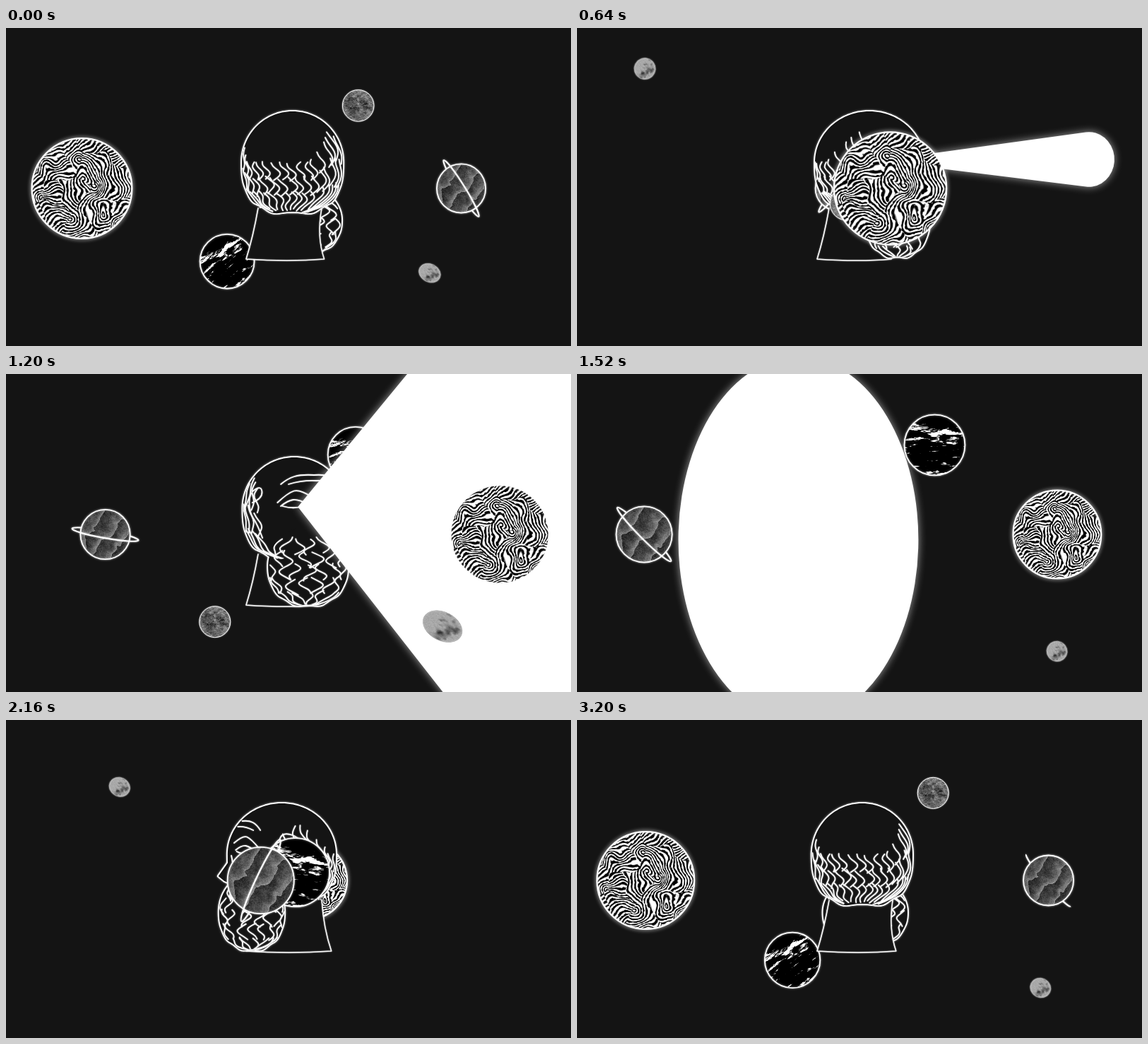
Recreate the animation shown at these times as an HTML page with a canvas. Size 800 by 450 pixels, loop 3280 ms.

```html
<!DOCTYPE html>
<html lang="en">
<head>
<meta charset="utf-8">
<title>Orbiting thoughts</title>
<style>
html, body { margin: 0; width: 100%; height: 100%; overflow: hidden; background: #141414; }
canvas { display: block; width: 800px; height: 450px; }
</style>
</head>
<body>
<canvas id="stage" width="800" height="450"></canvas>
<script>
const LOOP = 3280, STEP = 80, TURN = Math.PI * 2, BG = '#141414';
const ctx = document.getElementById('stage').getContext('2d');
const { sin, cos, acos, atan2, hypot, floor, min, max, abs, exp, sign } = Math;
const clamp = (v, a = 0, b = 1) => min(b, max(a, v));
const mix = (a, b, k) => a + (b - a) * k;
const turn = ms => TURN * ms / LOOP;
const rad = deg => deg * Math.PI / 180;
const bell = (t, peak, width) => exp(-(((t - peak) / width) ** 2));
const list = (n, make) => Array.from({ length: n }, (_, i) => make(i));

// ---------- planet surfaces ----------
const hash = (x, y) => { const s = sin(x * 127.1 + y * 311.7) * 43758.5453; return s - floor(s); };
function noise(x, y) {
  const i = floor(x), j = floor(y), fx = x - i, fy = y - j;
  const u = fx * fx * (3 - 2 * fx), v = fy * fy * (3 - 2 * fy);
  return mix(mix(hash(i, j), hash(i + 1, j), u), mix(hash(i, j + 1), hash(i + 1, j + 1), u), v);
}
const fbm = (x, y) => noise(x, y) * .5 + noise(x * 2.1 + 7, y * 2.1) * .3 + noise(x * 4.3, y * 4.3 + 5) * .2;

function surface(shade) {
  const size = 200, c = document.createElement('canvas');
  c.width = c.height = size;
  const g = c.getContext('2d'), img = g.createImageData(size, size);
  for (let i = 0; i < size * size; i++) {
    const v = 255 * clamp(shade(i % size / size * 2 - 1, floor(i / size) / size * 2 - 1));
    img.data.set([v, v, v, 255], i * 4);
  }
  g.putImageData(img, 0, 0);
  return c;
}

// Each patch of ridges is a set of arcs round a point beside the patch.
const patches = list(14, i => {
  const x = hash(i, 3) * 2.2 - 1.1, y = hash(i, 8) * 2.2 - 1.1, a = hash(i, 5) * TURN, far = .1 + .5 * hash(i, 6);
  return { x, y, ox: x + far * cos(a), oy: y + far * sin(a) };
});
const ridges = surface((x, y) => {
  const wx = x + .2 * noise(x * 4 + 9, y * 4), wy = y + .2 * noise(x * 4, y * 4 + 20);
  const away = p => hypot(wx - p.x, wy - p.y);
  const patch = patches.reduce((a, b) => away(a) < away(b) ? a : b);
  const grain = noise(x * 26 + 40, y * 26) - .5;
  return .5 + 1.1 * sin(hypot(wx - patch.ox, wy - patch.oy) * 100 + grain) + grain * 1.5;
});
const streaks = surface((x, y) => {
  const bend = y + .1 * noise(x * 2 + 5, y * 3);
  const cover = .13 * cos((bend + .35) * 4.5);
  return (fbm(x * 3 + 11, bend * 12 + 3) + .12 * noise(x * 24, y * 24) + cover - .7) * 8
    + .04 + .2 * noise(x * 30, y * 30) * noise(x * 4, y * 4);
});
const dunes = surface((x, y) => {
  const h = y * 1.5 + .6 * x + 1.3 * fbm(x * 1.6 + 3, y * 1.6 + 1), f = h - floor(h);
  return .1 + .34 * f * f + .16 * noise(x * 40, y * 40) + .16 * (fbm(x * 4, y * 4) - .4);
});
const clouds = surface((x, y) => .02 + .7 * fbm(x * 4 + 30, y * 7) + .2 * (noise(x * 30, y * 30) - .5));
const maria = surface((x, y) => .66 - .6 * clamp(fbm(x * 1.6 + 8, y * 1.6 + 4) - .48) * 2 + .08 * (noise(x * 24, y * 24) - .5));

// ---------- orbits: uniform turning seen in perspective ----------
const planets = [
  { skin: ridges, r: 65, cx: 400, cy: 227, dx: 300, dy: 0, near: 578, depth: .185, line: 2.3, glow: 6 },
  { skin: clouds, r: 21.2, cx: 400, cy: 227, dx: -107, dy: 127, near: 560, depth: .1, line: 1, glow: 2 },
  { skin: streaks, r: 41.2, cx: 400, cy: 227, dx: -106, dy: 126, near: 2200, depth: .15, line: 1.8, glow: 3,
    spin: t => rad(-17) + rad(27) * cos(turn(t - 2000)) },
  { skin: dunes, r: 37.7, cx: 400, cy: 227, dx: 299, dy: 0, near: 2215, depth: .2, line: 1.8, glow: 3,
    spin: () => rad(-30), ring: t => turn(t) - rad(121.8) },
  { skin: maria, r: 15, cx: 400, cy: 232, dx: 305, dy: 175, near: 2693, depth: .3, line: .6, glow: 2, laps: 2, smear: .65 }
];

function locate(p, t) {
  const a = turn(t - p.near) * (p.laps || 1), k = 1 / (1 - p.depth * cos(a));
  return {
    p, r: p.r * k, x: p.cx + p.dx * sin(a) * k, y: p.cy + p.dy * sin(a) * k,
    facing: cos(a), z: cos(a) * hypot(p.dx, p.dy)
  };
}

function glow(blur) {
  ctx.shadowColor = blur ? 'rgba(255,255,255,.6)' : 'transparent';
  ctx.shadowBlur = blur;
}

function drawPlanet({ p, x, y, r, facing }, t) {
  const halfRing = from => {
    ctx.beginPath();
    ctx.ellipse(0, 0, r * 1.36, r * .15, p.ring(t), from, from + Math.PI);
    ctx.lineWidth = 2.2;
    ctx.stroke();
  };
  ctx.save();
  ctx.translate(x, y);
  ctx.strokeStyle = '#fff';
  if (p.smear) {
    ctx.rotate(rad(27));
    ctx.scale(1 + p.smear * facing * facing, 1);
    ctx.strokeStyle = '#bbb';
  }
  glow(p.glow);
  if (p.ring) halfRing(Math.PI);
  ctx.beginPath();
  ctx.arc(0, 0, r, 0, TURN);
  ctx.fillStyle = '#111';
  ctx.fill();
  ctx.save();
  glow(0);
  ctx.clip();
  if (p.spin) ctx.rotate(p.spin(t));
  ctx.drawImage(p.skin, -r, -r, r * 2, r * 2);
  ctx.restore();
  ctx.lineWidth = p.line;
  ctx.stroke();
  if (p.ring && t < 3040) halfRing(0);
  ctx.restore();
}

// ---------- head: skull and beard are round solids turning about one axis ----------
function trace(path, pts) {
  path.moveTo(...pts[0]);
  for (let i = 1; i < pts.length - 1; i++) {
    const [x, y] = pts[i], [nx, ny] = pts[i + 1], last = i === pts.length - 2;
    path.quadraticCurveTo(x, y, last ? nx : (x + nx) / 2, last ? ny : (y + ny) / 2);
  }
}

// Rounded outline, squarer below its middle, with a wavy lower edge.
function blob({ x, y, rx, ry, square, wave }) {
  const path = new Path2D(), bend = (v, e) => sign(v) * abs(v) ** e;
  for (let i = 0; i < 120; i++) {
    const a = TURN * i / 120, low = max(0, sin(a)), e = low ? square : 1;
    path.lineTo(x + rx * bend(cos(a), e), y + ry * bend(sin(a), e) + wave * low * sin(a * 11));
  }
  path.closePath();
  return path;
}

// A strand is a list of [longitude in degrees from the nose, height].
const curl = (lon, y, length, sway, seed) =>
  list(6, s => [lon + sway * sin(seed * TURN + s * 1.1), y + length * s / 5]);

const hairline = lon => 188 - 44 * bell(abs(180 - lon), 82, 26);
const hair = list(66, i => {
  const row = i % 3, lon = 76 + 208 * (floor(i / 3) + .5 * hash(i, 1)) / 22;
  const top = hairline(lon), drop = (252 - top) / 3;
  return curl(lon, top + row * drop + 5 * hash(i, 2), drop * 1.15, 6, .15 * row + .25 * hash(i, 4));
});
const curls = list(80, i => {
  const row = i % 5, lon = 360 * (floor(i / 5) + row / 2 + .5 * hash(i, 9)) / 16;
  return curl(lon, 230 + row * 19 + 4 * hash(i, 7), 22, 11, hash(i, 11));
});

const mirrored = lines => [...lines, ...lines.map(l => l.map(([lon, y]) => [-lon, y]))];
const face = mirrored([
  [[0, 143], [20, 142], [40, 148], [48, 156]],
  [[0, 151], [20, 150], [38, 156]],
  [[10, 174], [24, 163], [38, 168], [50, 182]],
  [[16, 184], [26, 177], [38, 179], [46, 187]],
  [[18, 186], [30, 192], [44, 187]],
  [[6, 192], [12, 214], [2, 220]],
  [[86, 182], [70, 176], [76, 158], [98, 168], [92, 196], [78, 212], [74, 232]]
]);

function drawHead(t) {
  const yaw = turn(t - 1480), side = sin(yaw), ahead = cos(yaw), k = 1 / (1 - .06 * ahead);
  const skull = { x: 402 - 12 * side, y: 190, rx: hypot(71 * ahead, 77 * side), ry: 72, square: .75, wave: 2 };
  const beard = { x: 400 - 54 * side, y: 272, rx: hypot(60 * ahead, 45 * side), ry: 53 * k, square: .9, wave: 1.5 };
  const skullPath = blob(skull), beardPath = blob(beard);

  const nose = new Path2D();
  for (const [forward, y] of [[70, 182], [86, 198], [103, 221], [94, 228], [70, 238]]) nose.lineTo(400 - forward * side, y);
  nose.closePath();

  const foot = 453 + 8 * side;
  const neck = new Path2D('M357 255Q350 295 340 327Q400 331 ' + foot + ' 327Q' + (foot - 11) + ' 295 447 255');

  const solid = (...paths) => {
    glow(3);
    ctx.lineWidth = 4;
    paths.forEach(p => ctx.stroke(p));
    glow(0);
    paths.forEach(p => ctx.fill(p));
  };
  const engrave = (body, clip, lines) => {
    const path = new Path2D();
    for (const line of lines) {
      if (line.some(([lon]) => cos(yaw + rad(lon)) < .08)) continue;
      trace(path, line.map(([lon, y]) => {
        const v = min(1, abs(y - body.y) / body.ry), e = y > body.y ? body.square : 1;
        return [body.x - body.rx * (1 - v ** (2 / e)) ** (e / 2) * sin(yaw + rad(lon)), y];
      }));
    }
    ctx.save();
    ctx.clip(clip);
    glow(2);
    ctx.lineWidth = 1.8;
    ctx.stroke(path);
    ctx.restore();
  };
  const drawNeck = () => {
    glow(2);
    ctx.lineWidth = 1.5;
    ctx.fill(neck);
    ctx.stroke(neck);
  };

  ctx.save();
  ctx.lineCap = ctx.lineJoin = 'round';
  ctx.strokeStyle = '#fff';
  ctx.fillStyle = BG;
  if (ahead > -.3) {
    drawNeck();
    solid(skullPath, nose, beardPath);
    engrave(beard, beardPath, curls);
  } else {
    solid(beardPath);
    engrave(beard, beardPath, curls);
    drawNeck();
    solid(skullPath);
  }
  engrave(skull, skullPath, [...hair, ...face]);
  ctx.restore();
}

// ---------- beam: a cone from the brow to a disc that swings past the viewer ----------
function drawBeam(t) {
  const reach = min(clamp((t - 400) / 240), clamp((2120 - t) / 200));
  if (!reach) return;
  const yaw = turn(t - 1480), near = max(0, cos(yaw));
  const ax = 400 - 26 * sin(yaw), ay = 188;
  const cx = 400 - (325 + 520 * near) * sin(yaw + rad(1.5)) * reach, cy = 186 + 50 * near ** 10;
  const rx = 180 * bell(t, 1380, 583) * reach, ry = 411 * bell(t, 1250, 397) * reach;
  const u = (ax - cx) / rx, v = (ay - cy) / ry, d = hypot(u, v);
  const base = atan2(v, u), half = d > 1 ? acos(1 / d) : 0;
  ctx.save();
  glow(12);
  ctx.fillStyle = '#fff';
  ctx.beginPath();
  if (half) ctx.moveTo(ax, ay);
  ctx.ellipse(cx, cy, rx, ry, 0, base + half, base - half + TURN);
  ctx.closePath();
  ctx.fill();
  ctx.restore();
}

function render(t) {
  ctx.fillStyle = BG;
  ctx.fillRect(0, 0, 800, 450);
  const placed = planets.map(p => locate(p, t)).sort((a, b) => a.z - b.z);
  placed.filter(o => o.z < 0).forEach(o => drawPlanet(o, t));
  drawHead(t);
  drawBeam(t);
  placed.filter(o => o.z >= 0).forEach(o => drawPlanet(o, t));
}

const start = performance.now();
function tick() {
  render(floor((performance.now() - start) % LOOP / STEP) * STEP);
  requestAnimationFrame(tick);
}
tick();
</script>
</body>
</html>
```
